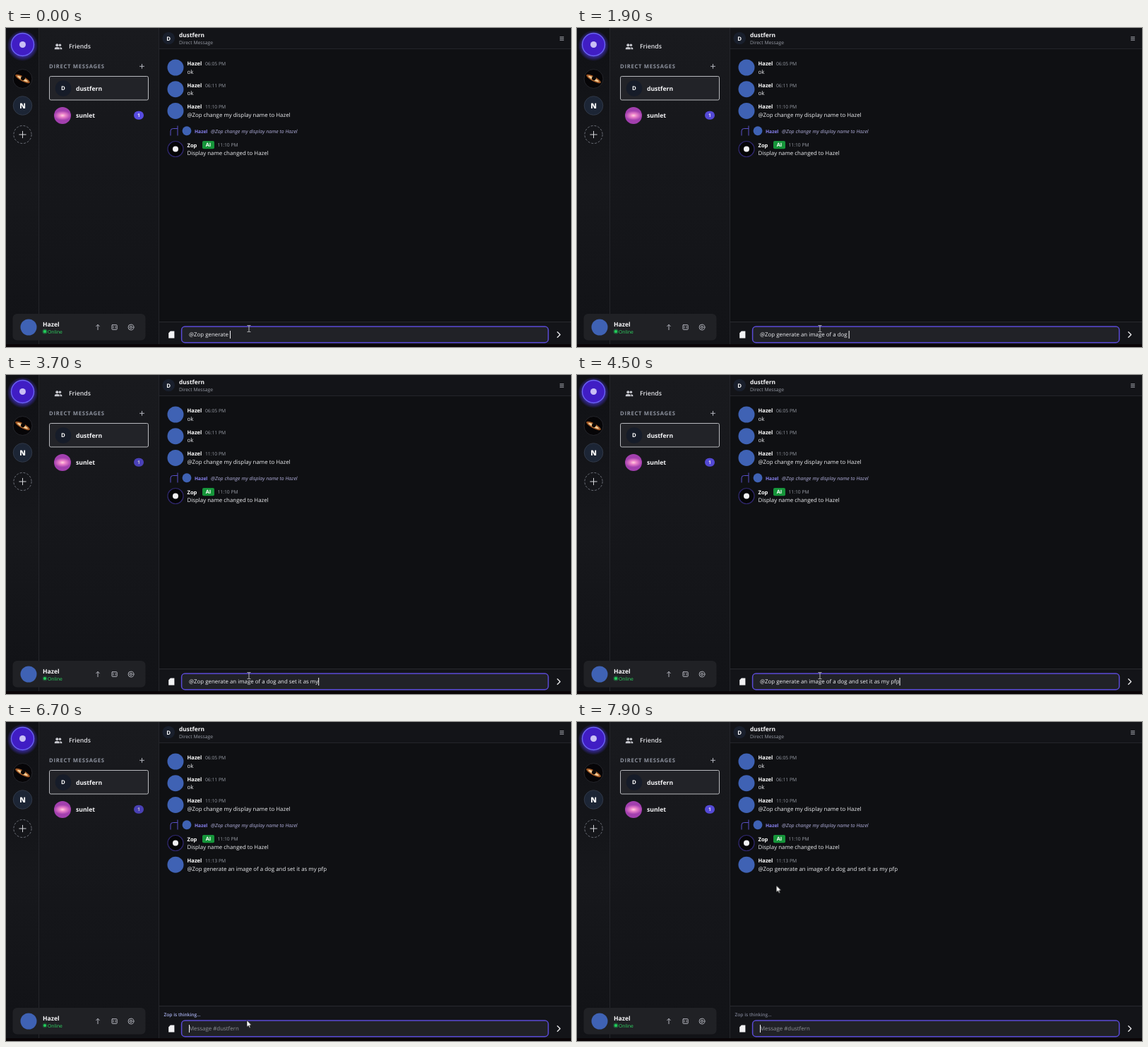
Animation of 800 by 452 pixels, one loop 8 s. Source, as an HTML page:

```html
<!DOCTYPE html>
<html lang="en">
<head>
<meta charset="utf-8">
<title>Direct messages</title>
<style>
  html, body { margin: 0; width: 100%; height: 100%; overflow: hidden; background: #0f1013; }
  svg { display: block; width: 800px; height: 452px; }
  text { font: 7.9px "Open Sans", "Noto Sans", sans-serif; fill: #f0f1f4; white-space: pre; text-rendering: geometricPrecision; }
  .name { font-weight: 700; font-size: 7.6px; fill: #fff; }
  .time { font-size: 6.75px; fill: #989ca6; }
  .title { font-weight: 700; font-size: 8.6px; fill: #f7f7f9; }
  .label { font-weight: 700; font-size: 7.7px; letter-spacing: .7px; fill: #8e939f; }
  .mid { text-anchor: middle; font-weight: 700; fill: #fff; }
  .line { fill: none; stroke: #b4b6be; stroke-linecap: round; stroke-linejoin: round; }

  .before, .after { animation: 8s step-end infinite; }
  .before { animation-name: leave; }
  .after { animation-name: enter; }
  @keyframes leave { 0% { visibility: visible; } 66.25%, 100% { visibility: hidden; } }
  @keyframes enter { 0% { visibility: hidden; } 66.25%, 100% { visibility: visible; } }

  .pulse { animation: pulse 2s -1.81s cubic-bezier(.4, 0, .6, 1) infinite; }
  @keyframes pulse { 50% { opacity: .5; } }
  .glow { animation: glow 2s -1.81s ease-in-out infinite; }
  @keyframes glow { 50% { opacity: 0; } }
  .think { font-weight: 600; font-size: 6.6px; animation: think 2s -1.35s ease-in-out infinite; }
  @keyframes think { 0%, 100% { fill: #a9b2f0; } 50% { fill: #747782; } }

  .beam { animation: beam 8s step-end infinite; }
  @keyframes beam { 0% { visibility: visible; } 82.5%, 100% { visibility: hidden; } }
  .arrow { animation: show 8s step-end infinite, move 8s infinite; }
  @keyframes show { 0% { visibility: hidden; } 82.5%, 100% { visibility: visible; } }
  @keyframes move {
    0%, 84.5% { transform: translate(341px, 422.6px); animation-timing-function: ease-in-out; }
    96%, 100% { transform: translate(282.3px, 231.6px); }
  }
</style>
</head>
<body>
<svg viewBox="0 0 800 452">
  <defs>
    <linearGradient id="rail" x2="0" y2="1">
      <stop stop-color="#101115"/><stop offset=".5" stop-color="#17181c"/><stop offset="1" stop-color="#111216"/>
    </linearGradient>
    <linearGradient id="side" x2="0" y2="1">
      <stop stop-color="#191a1e"/><stop offset="1" stop-color="#121317"/>
    </linearGradient>
    <radialGradient id="dusk" gradientTransform="translate(0 .22) scale(1 .56)">
      <stop stop-color="#ffd2dc"/><stop offset=".35" stop-color="#ee84cc"/>
      <stop offset="1" stop-color="#a23fae"/>
    </radialGradient>
    <radialGradient id="halo">
      <stop offset=".72" stop-color="#4a35d8" stop-opacity=".6"/><stop offset="1" stop-color="#4a35d8" stop-opacity="0"/>
    </radialGradient>
    <circle id="face" r="11.5" fill="#3f62b4"/>
  </defs>

  <!-- panels -->
  <rect width="800" height="452" fill="#0f1013"/>
  <rect width="46" height="448" fill="url(#rail)"/>
  <rect x="47" width="169" height="448" fill="url(#side)"/>
  <rect x="217" width="583" height="29" fill="#131418"/>
  <path d="M46.5 0V448M216.5 0V448M217 29.5H800" stroke="#24252a"/>

  <!-- server rail -->
  <circle cx="23.5" cy="25" r="22" fill="url(#halo)"/>
  <circle cx="23.5" cy="23.5" r="16" fill="#401dc4" stroke="#6a63f2" stroke-width="1.4"/>
  <circle cx="23.5" cy="23.5" r="4.5" fill="#c9bff5"/>
  <circle cx="23.5" cy="72" r="13.5" fill="#060507" stroke="#25262c"/>
  <g transform="translate(23.5 72) rotate(28)">
    <ellipse rx="11.5" ry="3.4" fill="#a35a26"/>
    <ellipse rx="8.5" ry="1.8" fill="#f6cf98"/>
    <circle cy="-1" r="3" fill="#0b0706"/>
  </g>
  <circle cx="23.5" cy="110" r="13.3" fill="#1c2535" stroke="#303847"/>
  <text class="mid" x="23.5" y="113.7" style="font-size:10.4px;font-weight:800">N</text>
  <circle cx="23.5" cy="151" r="12.6" fill="none" stroke="#6c6f78" stroke-dasharray="3 2"/>
  <path class="line" d="M18.8 151h9.4M23.5 146.3v9.4" style="stroke:#d5d6da"/>

  <!-- conversations -->
  <g fill="#c9cad0">
    <circle cx="72.3" cy="24.2" r="2"/><path d="M68.8 30.2v-1.2q0-2 3.5-2t3.5 2v1.2z"/>
    <circle cx="76.4" cy="24.2" r="1.8"/><path d="M76.6 30.2v-1.4l-.7-1.6q3.4 0 3.4 1.9v1.1z"/>
  </g>
  <text x="89" y="29.3" style="font-weight:600;font-size:8.7px;fill:#e4e5e9">Friends</text>
  <text class="label" x="61" y="57">DIRECT MESSAGES</text>
  <path class="line" d="M189.5 54.3h6M192.5 51.3v6"/>
  <rect x="61.5" y="68.5" width="140" height="33.5" rx="2" fill="#222328" stroke="#b8b9bd"/>
  <circle cx="81" cy="85.5" r="11.3" fill="#161c29"/>
  <text class="mid" x="81" y="88.3">D</text>
  <text class="title" x="99" y="88.8">dustfern</text>
  <circle cx="80" cy="124" r="12" fill="url(#dusk)"/>
  <text class="title" x="99" y="127.2">sunlet</text>
  <g class="pulse">
    <rect x="181" y="117.8" width="14" height="12" rx="6" fill="#5b4fea"/>
    <text class="mid" x="188" y="126.2" style="font-size:6.8px">1</text>
  </g>

  <!-- own status -->
  <rect x="9.5" y="405" width="188" height="37.5" rx="6" fill="#202125"/>
  <use href="#face" x="32" y="424"/>
  <text class="title" x="52" y="422.8">Hazel</text>
  <circle class="glow" cx="55" cy="430" r="3.6" fill="#22c55e" opacity=".45"/>
  <circle cx="55" cy="430" r="2.1" fill="#22d05a"/>
  <text x="59" y="432.6" style="font-size:6.8px;fill:#2fd562">Online</text>
  <g class="line">
    <path d="M130 427.6v-7.2M127.7 422.7l2.3-2.3 2.3 2.3"/>
    <rect x="150" y="420.7" width="7.2" height="6.6" rx=".8"/>
    <path d="M152 422.8v2.4M155.2 422.8v2.4" stroke-width=".9"/>
    <circle cx="177" cy="424" r="3.9"/><circle cx="177" cy="424" r="1.6"/>
  </g>

  <!-- chat header -->
  <circle cx="230.2" cy="14.5" r="8.8" fill="#191f2c"/>
  <text class="mid" x="230.2" y="17.5">D</text>
  <text class="title" x="245" y="13.2" style="font-size:8.4px">dustfern</text>
  <text x="245" y="23" style="font-size:6.75px;fill:#989ca6">Direct Message</text>
  <path class="line" d="M784.5 12.8h5M784.5 15h5M784.5 17.2h5" style="stroke-width:.9"/>

  <!-- messages -->
  <g id="log"></g>
  <path class="line" d="M233 152.5v-6.5q0-3.5 3.5-3.5h6.5M243 138.5v14" style="stroke:#5a50c8;stroke-linecap:butt"/>
  <use href="#face" transform="translate(256 145.8) scale(.56)"/>
  <text x="267" y="148.5" style="font-weight:700;font-size:6.7px;fill:#8a83f2">Hazel</text>
  <text x="290" y="148.5" style="font-style:italic;font-size:7px;fill:#b4b2e0">@Zop change my display name to Hazel</text>
  <circle cx="240" cy="171.5" r="11" fill="#050507" stroke="#30286e" stroke-width="1.2"/>
  <circle cx="240" cy="171.5" r="4" fill="#f2f2f4"/>
  <text class="name" x="256.5" y="168.5">Zop</text>
  <rect x="278" y="160" width="17" height="11.2" rx="2" fill="#16953a"/>
  <text class="mid" x="286.5" y="168.3" style="font-size:7.4px">AI</text>
  <text class="time" x="299.5" y="168.3">11:10 PM</text>
  <text x="256.5" y="180">Display name changed to Hazel</text>

  <!-- composer -->
  <g class="before">
    <rect x="217" y="416" width="583" height="32" fill="#131418"/>
    <path d="M217 416.5H800" stroke="#292a2f"/>
  </g>
  <g class="after">
    <rect x="217" y="402" width="583" height="46" fill="#131418"/>
    <path d="M217 402.5H800" stroke="#292a2f"/>
    <text class="think" x="223.5" y="417">Zop is thinking...</text>
  </g>
  <path d="M232.8 429.6H238.4V439.4H230.2V432.2Z" fill="#f2f2f4"/>
  <rect x="248.6" y="423.1" width="519.2" height="22.6" rx="4.8" fill="#212227" stroke="#5b4bd6" stroke-width="1.5"/>
  <text class="after" x="259" y="437.3" style="fill:#8e9097">Message #dustfern</text>
  <text id="typed" class="before" x="259" y="437.3"></text>
  <text id="ghost" x="259" y="437.3" visibility="hidden"></text>
  <rect id="caret" y="429" width="1" height="11" fill="#f4f4f6"/>
  <path class="line" d="M780.8 430.8l3.8 3.7-3.8 3.7" style="stroke:#f0f0f2;stroke-width:1.3"/>
  <rect y="448" width="800" height="4" fill="#0a0507"/>

  <!-- pointer -->
  <path class="line beam" d="M342 421.5h1.3l.7.6.7-.6h1.3M344 422v8M342 430.5h1.3l.7-.6.7.6h1.3" style="stroke:#c4c4c8;stroke-width:.9"/>
  <path class="arrow" d="M0 0V9.6L2.3 7.6 3.8 11 5.3 10.3 3.8 7.1H6.8Z" fill="#fff" stroke="#000" stroke-width=".6"/>
</svg>
<script>
  const LOOP = 8000, SEND = 5300, LAST_KEY = 4200, BLINK = 530;
  const prompt = '@Zop generate an image of a dog and set it as my pfp';
  const keys = [[0, 14], [1900, 32], [2900, 43], [LAST_KEY, 52], [LOOP, 52]];
  const $ = id => document.getElementById(id);

  const row = (y, time, body, cls = '') => `<g class="${cls}" transform="translate(0 ${y})">
    <use href="#face" x="240"/>
    <text class="name" x="256.5" y="-3">Hazel</text>
    <text class="time" x="282" y="-3">${time}</text>
    <text x="256.5" y="8.6">${body}</text></g>`;

  $('log').innerHTML =
    row(56, '06:05 PM', 'ok') +
    row(86.7, '06:11 PM', 'ok') +
    row(117.4, '11:10 PM', '@Zop change my display name to Hazel') +
    row(202.2, '11:13 PM', prompt, 'after');
  $('ghost').textContent = prompt;

  function typedCount(t) {
    const i = keys.findIndex(k => k[0] > t);
    const [t0, n0] = keys[i - 1], [t1, n1] = keys[i];
    return Math.floor(n0 + (n1 - n0) * (t - t0) / (t1 - t0) + 1e-6);
  }

  const start = performance.now();
  function draw() {
    const t = Math.max(0, performance.now() - start) % LOOP;
    const n = typedCount(Math.floor(t / 100) * 100);
    const sent = t >= SEND;
    const idle = Math.max(0, t - (sent ? SEND : LAST_KEY));
    $('typed').textContent = prompt.slice(0, n);
    $('caret').setAttribute('x', 259 + (sent ? 0 : $('ghost').getSubStringLength(0, n)));
    $('caret').setAttribute('opacity', idle % (2 * BLINK) < BLINK ? 1 : 0);
    requestAnimationFrame(draw);
  }
  draw();
</script>
</body>
</html>
```
